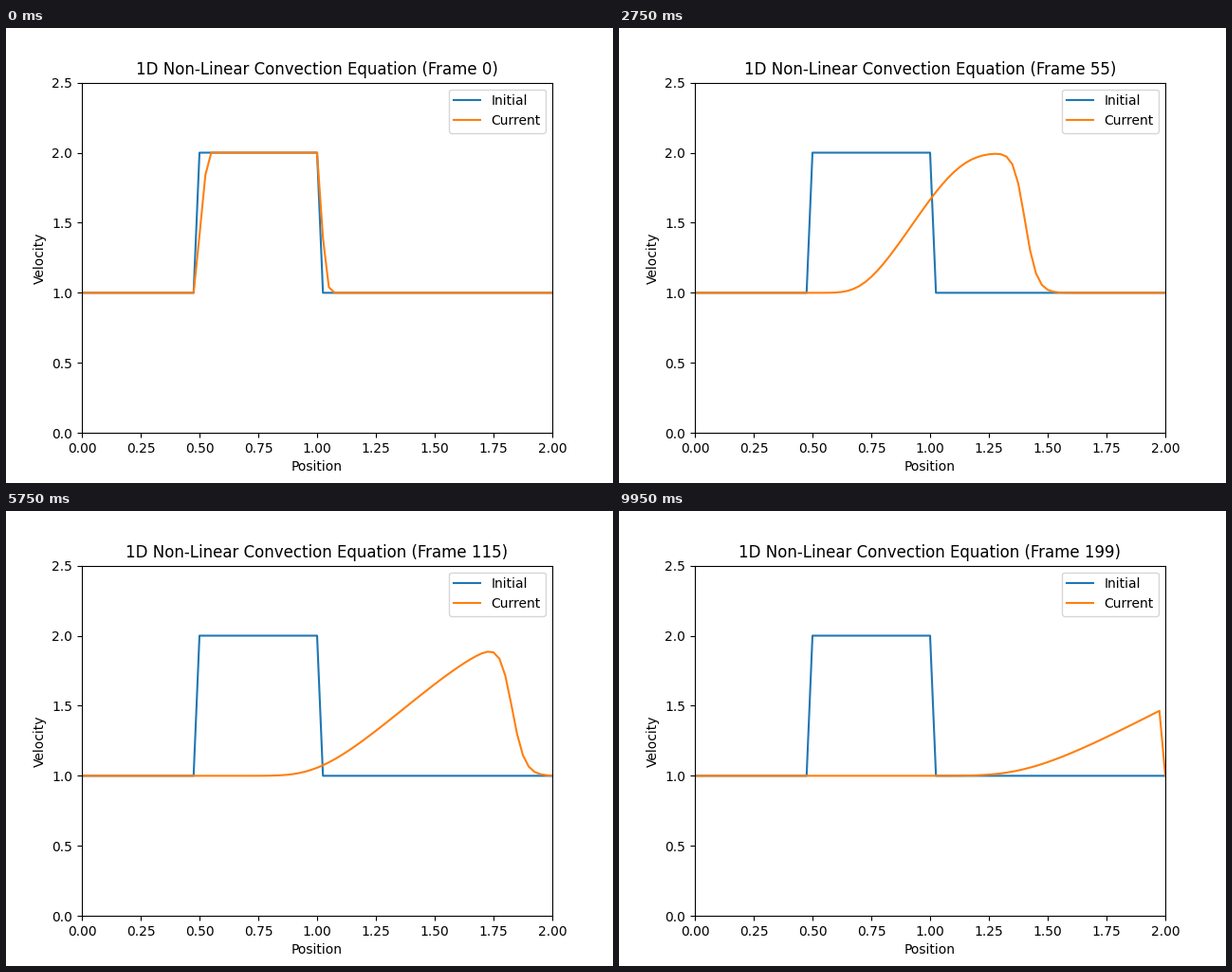
A matplotlib script that plays this animation: 640 px wide and 480 px high, repeating every 10000 ms.

```python
import numpy as np
import matplotlib.pyplot as plt
from matplotlib.animation import FuncAnimation

FRAMES = 200
INTERVAL = 50
NX = 81
LENGTH = 2.0
DT = 0.005
WARMUP = 2  # steps already taken when the first frame shows

plt.rcParams["font.family"] = "DejaVu Sans"

dx = LENGTH / (NX - 1)
x = np.linspace(0, LENGTH, NX)
initial = np.ones(NX)
initial[round(0.5 / dx):round(1.0 / dx) + 1] = 2


def step(u):
    """Advance one upwind step; both end points stay fixed."""
    new = u.copy()
    new[1:-1] -= u[1:-1] * DT / dx * (u[1:-1] - u[:-2])
    return new


def solve():
    u = initial
    for _ in range(WARMUP):
        u = step(u)
    history = [u]
    for _ in range(FRAMES - 1):
        history.append(step(history[-1]))
    return history


history = solve()

fig, ax = plt.subplots(figsize=(6.4, 4.8), dpi=100)
ax.plot(x, initial, label="Initial")
current, = ax.plot(x, history[0], label="Current")
ax.set_xlim(0, LENGTH)
ax.set_ylim(0, 2.5)
ax.set_xlabel("Position")
ax.set_ylabel("Velocity")
ax.legend(loc="upper right")
title = ax.set_title("")


def update(frame):
    current.set_ydata(history[frame])
    title.set_text(f"1D Non-Linear Convection Equation (Frame {frame})")
    return current, title


anim = FuncAnimation(fig, update, frames=FRAMES, interval=INTERVAL,
                     repeat=True, repeat_delay=0, blit=False)
plt.show()
```
